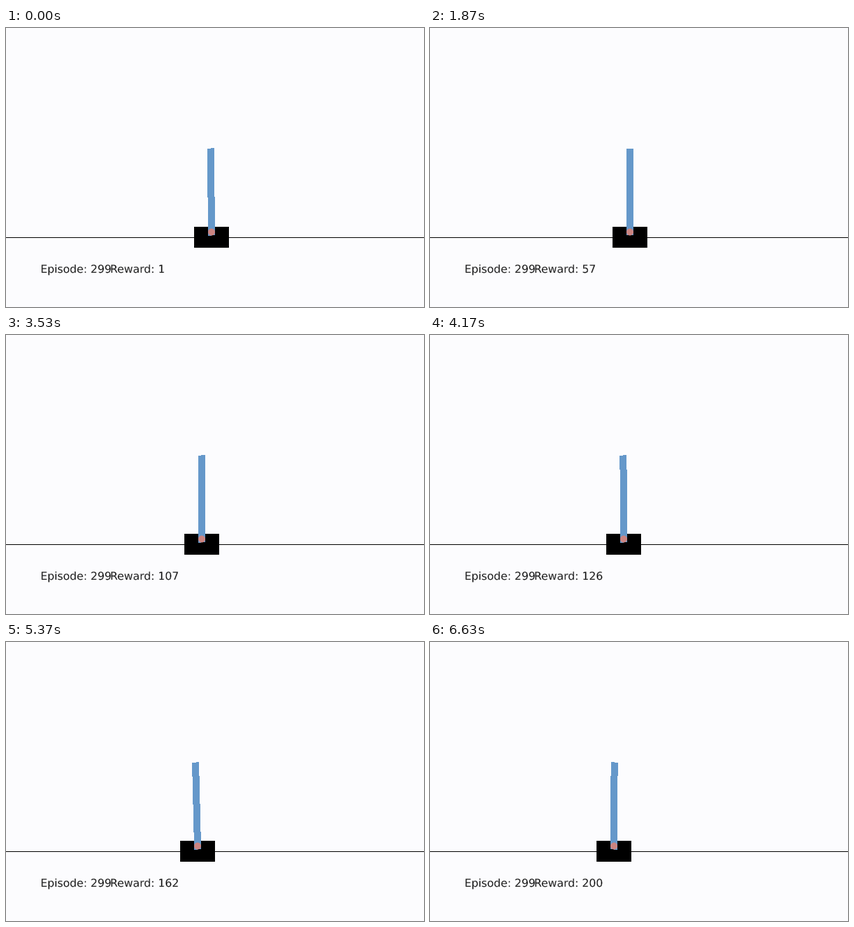
Recreate the animation shown at these times as a matplotlib script. Size 600 by 400 pixels, loop 6660 ms.

```python
import numpy as np
import matplotlib.pyplot as plt
from matplotlib.animation import FuncAnimation
from matplotlib.patches import Circle, Polygon, Rectangle
from matplotlib.patheffects import Normal, Stroke

W, H, DPI = 600, 400, 100
FRAMES, LOOP = 200, 6660
PX = 72 / DPI

BACK = "#fcfcfe"
POLE = "#6598ca"
AXLE = "#cb8481"

CART_W, CART_H = 50, 30
TRACK_Y, PIVOT_Y = 300, 292.5
POLE_W, POLE_LEN, POLE_TAIL = 10, 120, 5

# Cart centre and sideways shift of the pole's tip, in pixels, at key frames.
CART = ((0, 295), (24, 291), (144, 276), (161, 275), (199, 264))
LEAN = ((0, -1.2), (24, 0.2), (106, -0.4), (144, -0.8), (161, -3), (199, 0.6))


def at(keys, i):
    return np.interp(i, *zip(*keys))


def pole_shape(x, tilt):
    # Unsmoothed fills cover every touched pixel, so inset by half a pixel.
    side, top, low = POLE_W / 2 - 0.5, POLE_LEN - 0.5, 0.5 - POLE_TAIL
    c, s = np.cos(tilt), np.sin(tilt)
    box = ((-side, low), (-side, top), (side, top), (side, low))
    return [(x + u * c + v * s, PIVOT_Y + u * s - v * c) for u, v in box]


fig = plt.figure(figsize=(W / DPI, H / DPI), dpi=DPI, facecolor=BACK)
ax = fig.add_axes([0, 0, 1, 1])
ax.set(xlim=(0, W), ylim=(H, 0))
ax.axis("off")

ax.add_patch(Rectangle((0, TRACK_Y), W, 1, fc="k", lw=0))
cart = ax.add_patch(Rectangle((0, TRACK_Y - CART_H / 2), CART_W, CART_H,
                              fc="k", lw=0))
pole = ax.add_patch(Polygon(pole_shape(0, 0), fc=POLE, lw=0, aa=False))
axle = ax.add_patch(Circle((0, PIVOT_Y), POLE_W / 2, fc=AXLE, lw=0))


def label(text, x):
    # A thin background outline slims the letters to about one pixel.
    slim = [Normal(), Stroke(linewidth=0.35 * PX, foreground=BACK)]
    return ax.text(x, 351, text, family="DejaVu Sans", size=15.7 * PX,
                   va="baseline", path_effects=slim)


label("Episode: 299", 49.5)
reward = label("", 149.5)


def update(i):
    x = round(at(CART, i))
    cart.set_x(x - CART_W / 2)
    pole.set_xy(pole_shape(x, np.arcsin(at(LEAN, i) / POLE_LEN)))
    axle.set_center((x, PIVOT_Y))
    reward.set_text(f"Reward: {i + 1}")
    return cart, pole, axle, reward


anim = FuncAnimation(fig, update, frames=FRAMES, interval=LOOP / FRAMES,
                     repeat=True, repeat_delay=0)
plt.show()
```
